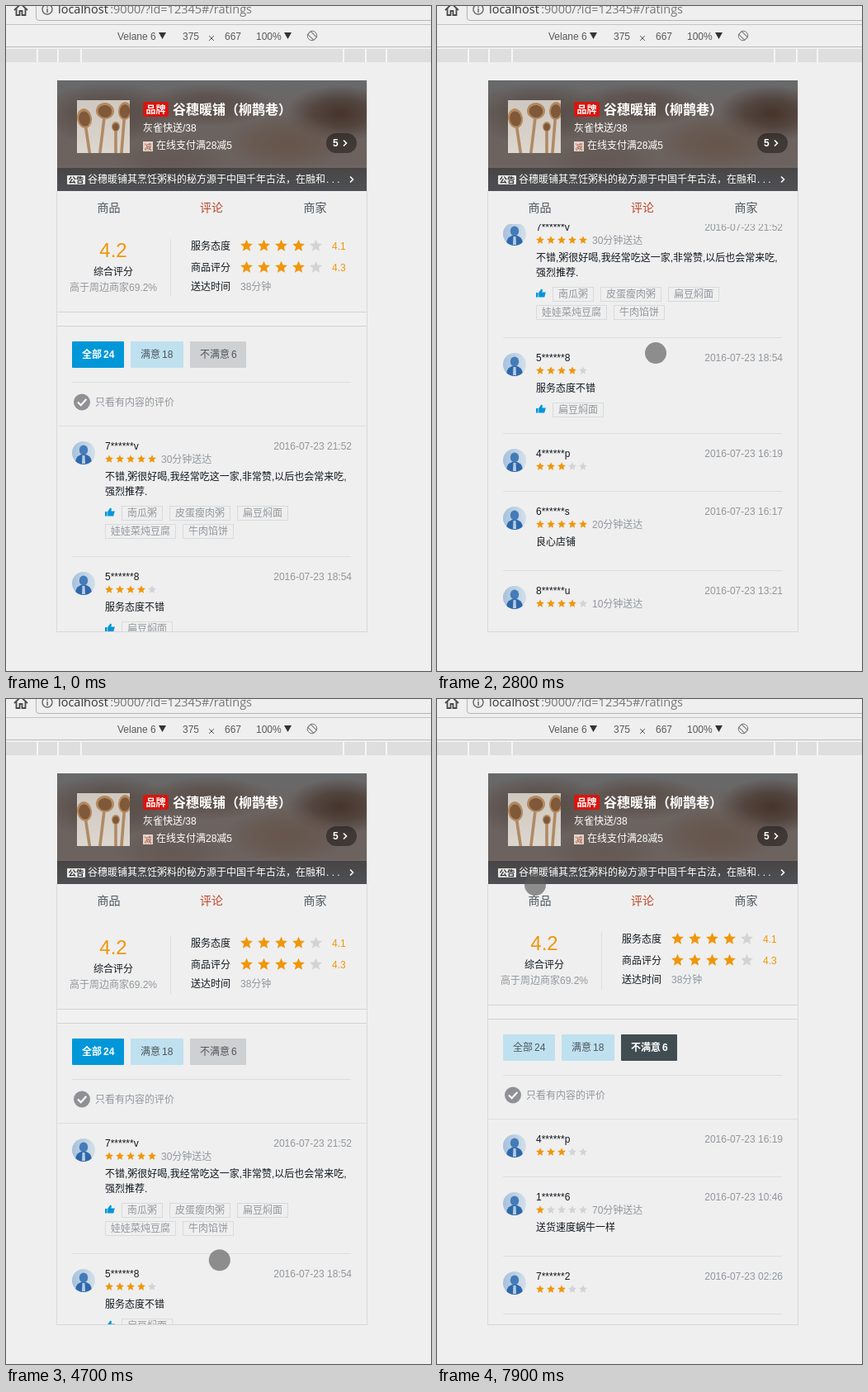
Write an HTML page with a canvas that moves like this. It is 515 px wide and 805 px high and loops after 8000 ms.

```html
<!DOCTYPE html>
<html lang="zh">
<head>
<meta charset="utf-8">
<title>Ratings</title>
<style>
html, body { margin: 0; width: 515px; height: 805px; overflow: hidden; background: #efefef; }
canvas { display: block; width: 515px; height: 805px; }
</style>
</head>
<body>
<canvas id="stage"></canvas>
<script>
const W = 515, H = 805, LOOP = 8000;
const canvas = document.getElementById('stage');
const ratio = window.devicePixelRatio || 1;
canvas.width = W * ratio;
canvas.height = H * ratio;
const ctx = canvas.getContext('2d');

const SANS = '"Liberation Sans", "Noto Sans CJK SC", "Noto Sans CJK", sans-serif';
const BG = '#efefef', INK = '#14191f', SLATE = '#4d555d', GRAY = '#93979c';
const ORANGE = '#f0960a', BLUE = '#0097d8', RULE = '#dcdddd';

const reviews = {
  first: { name: '7******v', date: '2016-07-23 21:52', score: 5, time: 30, height: 158,
    lines: ['不错,粥很好喝,我经常吃这一家,非常赞,以后也会常来吃,', '强烈推荐.'],
    tags: [['南瓜粥', '皮蛋瘦肉粥', '扁豆焖面'], ['娃娃菜炖豆腐', '牛肉馅饼']] },
  second: { name: '5******8', date: '2016-07-23 18:54', score: 4, height: 116,
    lines: ['服务态度不错'], tags: [['扁豆焖面']] },
  third: { name: '4******p', date: '2016-07-23 16:19', score: 3, height: 70 },
  fourth: { name: '6******s', date: '2016-07-23 16:17', score: 5, time: 20, height: 96, lines: ['良心店铺'] },
  fifth: { name: '8******u', date: '2016-07-23 13:21', score: 4, time: 10, height: 74 },
  slow: { name: '1******6', date: '2016-07-23 10:46', score: 1, time: 70, height: 96, lines: ['送货速度蜗牛一样'] },
  late: { name: '7******2', date: '2016-07-23 02:26', score: 3, height: 70 }
};
const allList = [reviews.first, reviews.second, reviews.third, reviews.fourth, reviews.fifth];
const badList = [reviews.third, reviews.slow, reviews.late];

// time, x, y
const pointer = [
  [300, 200, 70], [900, 150, 431], [1350, 110, 560], [1800, 244, 696], [2100, 245, 697],
  [2750, 265, 420], [3600, 266, 427], [4300, 257, 729], [4500, 257, 738], [5200, 266, 444],
  [5500, 262, 440], [5850, 183, 424], [6050, 183, 424], [6400, 261, 444], [6650, 257, 428],
  [6850, 257, 428], [7250, 290, 705], [7600, 150, 450], [7900, 119, 225]
];
// time, offset
const scrolls = [[2100, 0], [2750, 265], [2800, 265], [3600, 258], [4300, -10], [4500, -13]];
const BOUNCE = 700;

function sample(keys, t) {
  if (t <= keys[0][0]) return keys[0].slice(1);
  for (let i = 1; i < keys.length; i++) {
    const a = keys[i - 1], b = keys[i];
    if (t > b[0]) continue;
    const p = (t - a[0]) / (b[0] - a[0]);
    const e = p * p * (3 - 2 * p);
    return a.slice(1).map((v, k) => v + (b[k + 1] - v) * e);
  }
  return keys[keys.length - 1].slice(1);
}

function scrollAt(t) {
  const p = Math.min(1, Math.max(0, (t - 4500) / BOUNCE));
  return Math.round(sample(scrolls, t)[0] * Math.pow(1 - p, 3));
}

function rect(x, y, w, h, color) {
  ctx.fillStyle = color;
  ctx.fillRect(x, y, w, h);
}

function round(x, y, w, h, r, color) {
  ctx.fillStyle = color;
  ctx.beginPath();
  ctx.roundRect(x, y, w, h, r);
  ctx.fill();
}

function ellipse(x, y, rx, ry, color) {
  ctx.fillStyle = color;
  ctx.beginPath();
  ctx.ellipse(x, y, rx, ry, 0, 0, Math.PI * 2);
  ctx.fill();
}

function disc(x, y, r, color) {
  ellipse(x, y, r, r, color);
}

function text(s, x, y, color, size = 12, weight = '', align = 'left', family = SANS) {
  ctx.font = `${weight} ${size}px ${family}`;
  ctx.fillStyle = color;
  ctx.textAlign = align;
  ctx.fillText(s, x, y);
}

function path(points, color, width, close) {
  ctx.beginPath();
  points.forEach(([x, y], i) => i ? ctx.lineTo(x, y) : ctx.moveTo(x, y));
  if (close) ctx.closePath();
  if (width) {
    ctx.strokeStyle = color;
    ctx.lineWidth = width;
    ctx.stroke();
  } else {
    ctx.fillStyle = color;
    ctx.fill();
  }
}

function ring(x, y, r, color, width) {
  ctx.strokeStyle = color;
  ctx.lineWidth = width;
  ctx.beginPath();
  ctx.arc(x, y, r, 0, Math.PI * 2);
  ctx.stroke();
}

function clip(x, y, w, h) {
  ctx.save();
  ctx.beginPath();
  ctx.rect(x, y, w, h);
  ctx.clip();
}

function stars(x, y, step, r, score) {
  for (let i = 0; i < 5; i++) {
    const points = [];
    for (let k = 0; k < 10; k++) {
      const a = -Math.PI / 2 + k * Math.PI / 5;
      const d = k % 2 ? r * 0.46 : r;
      points.push([x + i * step + d * Math.cos(a), y + 0.5 + d * Math.sin(a)]);
    }
    path(points, i < score ? ORANGE : '#d2d3d4', 0, true);
  }
}

function browserBar() {
  // home
  path([[10, 5], [18, -2.5], [26, 5]], '#4a4a4a', 1.8);
  path([[12.5, 3], [12.5, 11], [16.5, 11], [16.5, 6], [19.5, 6], [19.5, 11], [23.5, 11], [23.5, 3]], '#4a4a4a', 1.8);
  // address field
  ctx.strokeStyle = '#b4b4b4';
  ctx.lineWidth = 1;
  ctx.beginPath();
  ctx.moveTo(36.5, 0);
  ctx.lineTo(36.5, 14);
  ctx.quadraticCurveTo(36.5, 17.5, 40, 17.5);
  ctx.lineTo(W, 17.5);
  ctx.stroke();
  ring(50, 4, 6, '#666', 1.4);
  rect(49.3, 3, 1.5, 5, '#666');
  rect(49.3, 0.5, 1.5, 1.5, '#666');
  const url = '"Open Sans", "Noto Sans", sans-serif';
  text('localhost', 63, 9, '#333', 14.5, '', 'left', url);
  text(':9000/?id=12345#/ratings', 298, 9, '#777', 14.5, '', 'right', url);
  rect(0, 22, W, 1, '#c4c4c4');
  // device toolbar
  const c = '#5a5a5a';
  text('Velane 6', 135, 41, c);
  path([[185, 32], [194, 32], [189.5, 40]], '#333', 0, true);
  text('375', 214, 41, c);
  path([[246, 36], [252, 42]], c, 1);
  path([[252, 36], [246, 42]], c, 1);
  text('667', 265, 41, c);
  text('100%', 303, 41, c);
  path([[337, 32], [346, 32], [341.5, 40]], '#333', 0, true);
  ring(371, 36, 5.8, '#777', 1);
  ctx.save();
  ctx.translate(371, 36);
  ctx.rotate(-Math.PI / 4);
  rect(-2.5, -6, 5, 12, BG);
  ctx.strokeStyle = '#777';
  ctx.strokeRect(-2.5, -5, 5, 10);
  ctx.restore();
  rect(0, 49, W, 1, '#bdbdbd');
  rect(0, 52, W, 16, '#dedede');
  for (const x of [37, 62, 90, 408, 435, 460]) rect(x, 52, 2, 16, '#f5f5f5');
}

// soft elliptical blot
function glow(x, y, rx, ry, color) {
  ctx.save();
  ctx.translate(x, y);
  ctx.scale(rx, ry);
  const g = ctx.createRadialGradient(0, 0, 0, 0, 0, 1);
  g.addColorStop(0, `rgba(${color},0.9)`);
  g.addColorStop(0.5, `rgba(${color},0.6)`);
  g.addColorStop(1, `rgba(${color},0)`);
  rect(-1, -1, 2, 2, g);
  ctx.restore();
}

function spoon(x, y, rx, ry, tilt) {
  ctx.save();
  ctx.translate(x, y);
  ctx.rotate(tilt);
  rect(-1.8, ry - 2, 3.6, 60, '#b08a64');
  ellipse(0, 0, rx, ry, '#b38a5e');
  ellipse(0, 0.5, rx * 0.76, ry * 0.76, '#80583a');
  ctx.restore();
}

function photo() {
  clip(86, 114, 64, 64);
  const g = ctx.createLinearGradient(0, 114, 0, 178);
  g.addColorStop(0, '#cfc8c1');
  g.addColorStop(1, '#dcd6cf');
  rect(86, 114, 64, 64, g);
  spoon(95, 136, 9, 12, -0.15);
  spoon(120, 127, 11, 10, 0.12);
  spoon(144, 127, 8, 11, 0.08);
  spoon(133, 146, 5, 6, 0);
  ctx.restore();
}

function header() {
  clip(62, 90, 375, 134);
  const g = ctx.createLinearGradient(0, 90, 0, 224);
  g.addColorStop(0, '#68696b');
  g.addColorStop(0.3, '#6b6461');
  g.addColorStop(0.75, '#6c625e');
  g.addColorStop(1, '#77777a');
  rect(62, 90, 375, 134, g);
  glow(125, 130, 85, 38, '84,72,66');
  glow(245, 120, 80, 26, '88,74,67');
  glow(405, 130, 65, 34, '66,47,38');
  glow(340, 165, 75, 34, '101,83,73');
  glow(200, 185, 70, 28, '99,88,83');

  rect(62, 196, 375, 28, 'rgba(7,12,18,0.36)');
  photo();

  round(166, 116, 31, 18, 2, '#d8160f');
  text('品牌', 181.5, 129.5, '#fff', 12, 'bold', 'center');
  text('谷穗暖铺（柳鹊巷）', 202, 130.5, '#fff', 16, 'bold');
  text('灰雀快送/38', 166, 152, '#fff');
  rect(166, 164, 12, 12, '#e3d3ca');
  text('减', 172, 173.5, '#a4543c', 9, '', 'center');
  text('在线支付满28减5', 182, 173, '#fff');
  round(388, 154, 37, 24, 12, 'rgba(20,16,15,0.5)');
  text('5', 396, 170, '#fff', 12, 'bold');
  path([[409, 162.5], [412.5, 166], [409, 169.5]], '#fff', 1.6);

  round(74, 205, 22, 11, 1, '#e9e9e9');
  text('公告', 85, 214, '#333', 9.5, 'bold', 'center');
  text('谷穗暖铺其烹饪粥料的秘方源于中国千年古法，在融和', 99, 214, '#fff');
  text('. . .', 388, 214, '#fff');
  path([[417, 206.5], [420.5, 210], [417, 213.5]], '#fff', 1.6);
  ctx.restore();

  text('商品', 124.5, 249, SLATE, 14, '', 'center');
  text('评论', 249, 249, '#bd4526', 14, '', 'center');
  text('商家', 374.5, 249, SLATE, 14, '', 'center');
}

function overview() {
  text('4.2', 130, 304, ORANGE, 24, '', 'center');
  text('综合评分', 130, 326, INK, 12, '', 'center');
  text('高于周边商家69.2%', 77, 345, GRAY);
  rect(199, 282, 1, 70, RULE);
  [['服务态度', '4.1', 290], ['商品评分', '4.3', 316]].forEach(([label, score, y]) => {
    text(label, 224, y + 5, INK);
    stars(291.5, y, 21, 7.8, 4);
    text(score, 395, y + 5, ORANGE);
  });
  text('送达时间', 224, 344, INK);
  text('38分钟', 284, 344, GRAY);
  rect(62, 370, 375, 1, '#d2d3d4');
  rect(62, 371, 375, 16, '#f1f1f1');
  rect(62, 387, 375, 1, '#d2d3d4');
}

function filters(active) {
  const buttons = [['全部', 24, 80, 63], ['满意', 18, 151, 64], ['不满意', 6, 223, 68]];
  buttons.forEach(([label, count, x, w], i) => {
    const on = i === active;
    const fill = i === 2 ? (on ? '#414e51' : '#cfd0d1') : (on ? BLUE : '#bfe1ef');
    const color = on ? '#fff' : SLATE;
    const weight = on ? 'bold' : '';
    round(x, 406, w, 32, 1, fill);
    text(label, x + 12, 426, color, 12, weight);
    text(count, x + 14 + label.length * 12, 426, color, 12, weight);
  });
  rect(80, 455, 338, 1, RULE);
  disc(92, 479.5, 10, '#8f9194');
  path([[87, 479.5], [90.7, 483.2], [97.3, 476]], '#fff', 2.2);
  text('只看有内容的评价', 108, 484, GRAY);
  rect(62, 508, 375, 1, RULE);
}

function avatar(x, y) {
  ctx.save();
  ctx.beginPath();
  ctx.arc(x, y, 14, 0, Math.PI * 2);
  ctx.clip();
  const g = ctx.createLinearGradient(x - 14, y, x + 14, y);
  g.addColorStop(0, '#a6c1dd');
  g.addColorStop(1, '#d3e0ea');
  rect(x - 14, y - 14, 28, 28, g);
  ellipse(x, y + 11, 10, 9.5, '#2f68aa');
  ellipse(x, y - 3.5, 5.2, 6, '#447bb8');
  path([[x - 1.5, y + 3], [x + 1.5, y + 3], [x + 2, y + 13], [x - 2, y + 13]], '#b4cce4', 0, true);
  ctx.restore();
}

function thumb(x, y) {
  rect(x - 6, y - 1, 2.5, 5.5, BLUE);
  path([[x - 2.8, y - 1], [x + 0.3, y - 5.5], [x + 2, y - 4.5], [x + 1.4, y - 1.6],
    [x + 5.8, y - 1.6], [x + 4.2, y + 4.5], [x - 2.8, y + 4.5]], BLUE, 0, true);
}

function review(r, y) {
  avatar(94, y + 32);
  text(r.name, 120, y + 28, INK);
  text(r.date, 419, y + 28, GRAY, 12, '', 'right');
  stars(125, y + 39, 13, 5.2, r.score);
  if (r.time) text(r.time + '分钟送达', 188, y + 44, GRAY);
  const lines = r.lines || [];
  lines.forEach((s, i) => text(s, 120, y + 65 + i * 18, INK));
  if (r.tags) {
    const top = y + 61 + lines.length * 18;
    thumb(126, top + 7);
    r.tags.forEach((row, i) => {
      let x = i ? 120 : 140;
      for (const tag of row) {
        const w = tag.length * 12 + 14;
        ctx.strokeStyle = '#d8dadb';
        ctx.lineWidth = 1;
        ctx.strokeRect(x + 0.5, top + i * 22 - 0.5, w - 1, 17);
        text(tag, x + 7, top + i * 22 + 12, GRAY);
        x += w + 8;
      }
    });
  }
  rect(80, y + r.height - 1, 338, 1, RULE);
}

function draw(t) {
  ctx.setTransform(ratio, 0, 0, ratio, 0, 0);
  rect(0, 0, W, H, BG);
  browserBar();
  header();

  const active = t < 5950 ? 0 : t < 6750 ? 1 : 2;
  clip(62, 264, 375, 493);
  ctx.translate(0, -scrollAt(t));
  overview();
  filters(active);
  let y = 509;
  for (const r of active === 2 ? badList : allList) {
    review(r, y);
    y += r.height;
  }
  ctx.restore();

  rect(61, 224, 1, 534, '#dadada');
  rect(437, 90, 1, 668, '#dadada');
  rect(61, 757, 377, 1, '#d6d6d6');

  if (t >= pointer[0][0]) {
    const [px, py] = sample(pointer, t);
    clip(62, 90, 375, 667);
    disc(px, py, 13, 'rgba(90,90,90,0.66)');
    ctx.restore();
  }
}

function frame(now) {
  draw(now % LOOP);
  requestAnimationFrame(frame);
}
requestAnimationFrame(frame);
</script>
</body>
</html>
```
